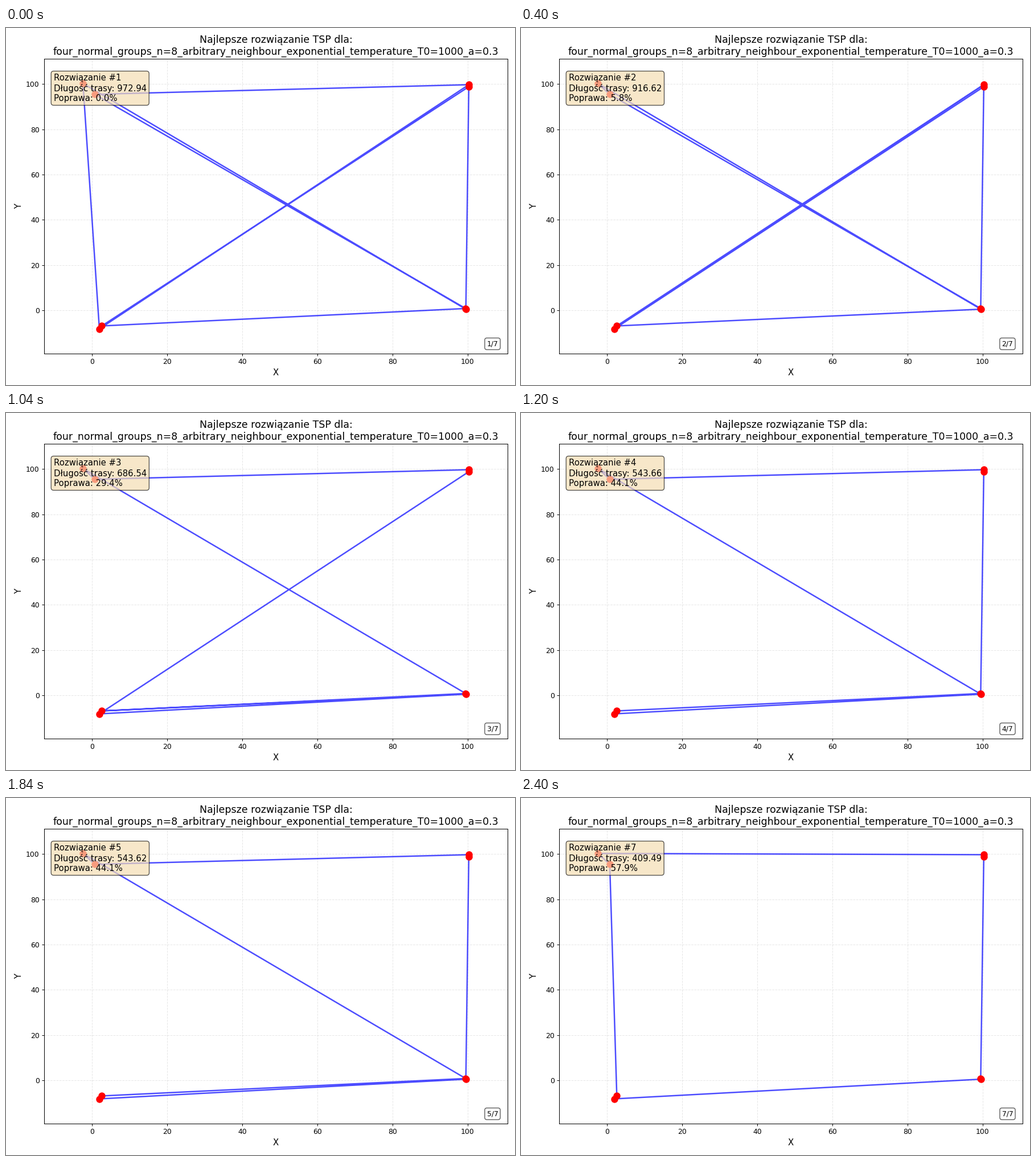
A matplotlib script that plays this animation: 894x626 px, repeating every 2800 ms.

```python
import matplotlib.pyplot as plt
from matplotlib.animation import FuncAnimation

W, H, DPI = 894, 626, 89.4
STEP_MS = 400

plt.rcParams["font.family"] = "DejaVu Sans"

# Two cities near each corner of a square.
CITIES = {
    "A": (-2.42, 100.3), "B": (0.72, 95.5),
    "C": (100.32, 99.75), "D": (100.32, 98.85),
    "E": (99.5, 0.8), "F": (99.54, 0.5),
    "G": (2.6, -6.9), "H": (1.95, -8.2),
}

# Each best tour found, with its length.
TOURS = [
    ("AHCBEGDF", 972.94),
    ("ABEDHCGF", 916.62),
    ("ABCDHFGE", 686.54),
    ("ABCDEGHF", 543.66),
    ("ABCDFHGE", 543.62),
    ("ABCDEFHG", 411.29),
    ("ACDEFHGB", 409.49),
]


def padded(values, share=0.1):
    lo, hi = min(values), max(values)
    pad = share * (hi - lo)
    return lo - pad, hi + pad


fig, ax = plt.subplots(figsize=(W / DPI, H / DPI), dpi=DPI)
fig.subplots_adjust(left=67.4 / W, right=880.6 / W,
                    bottom=1 - 570.6 / H, top=1 - 54.2 / H)

xs, ys = zip(*CITIES.values())
ax.set_xlim(padded(xs))
ax.set_ylim(padded(ys))
ax.grid(True, linestyle="--", alpha=0.3)
ax.set_xlabel("X", fontsize=12)
ax.set_ylabel("Y", fontsize=12)
ax.set_title("Najlepsze rozwiązanie TSP dla:\n"
             "four_normal_groups_n=8_arbitrary_neighbour_"
             "exponential_temperature_T0=1000_a=0.3", fontsize=14)

route, = ax.plot([], [], "b-", linewidth=2, alpha=0.7)
ax.plot(xs, ys, "ro", markersize=10, markeredgewidth=0)
info = ax.text(0.02, 0.95, "", transform=ax.transAxes, fontsize=12, va="top",
               bbox=dict(boxstyle="round", facecolor="wheat", alpha=0.7))
page = ax.text(0.98, 0.02, "", transform=ax.transAxes, fontsize=10,
               ha="right", va="bottom",
               bbox=dict(boxstyle="round", facecolor="white", alpha=0.7))


def draw(i):
    tour, length = TOURS[i]
    route.set_data(*zip(*(CITIES[c] for c in tour + tour[0])))
    gain = 100 * (1 - length / TOURS[0][1])
    info.set_text(f"Rozwiązanie #{i + 1}\n"
                  f"Długość trasy: {length:.2f}\n"
                  f"Poprawa: {gain:.1f}%")
    page.set_text(f"{i + 1}/{len(TOURS)}")
    return route, info, page


anim = FuncAnimation(fig, draw, frames=len(TOURS), interval=STEP_MS,
                     repeat=True, repeat_delay=0)
plt.show()
```
